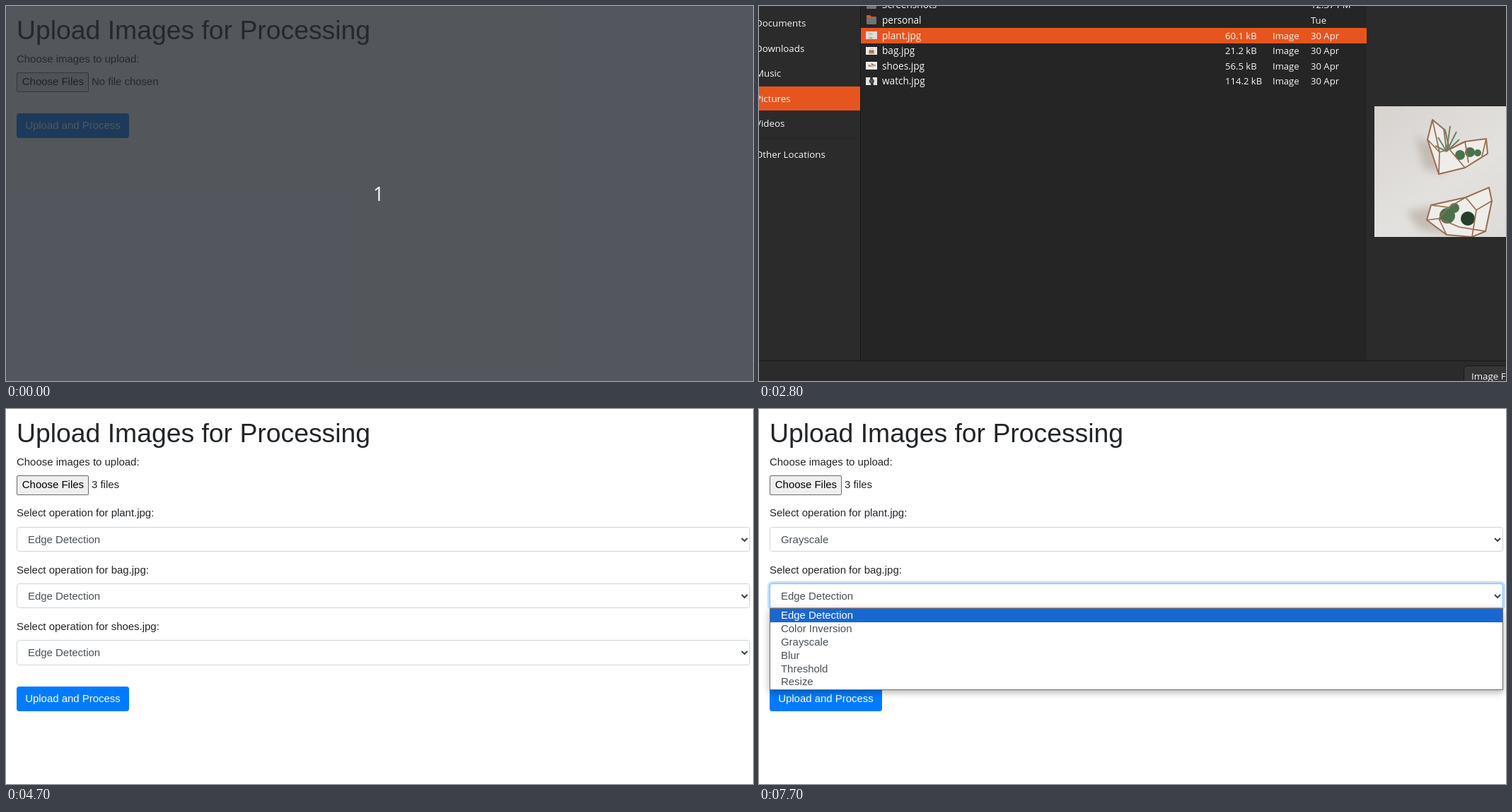
An HTML page for the animation above (8000 ms loop, 1056x531 px).

```html
<!DOCTYPE html>
<html lang="en">
<head>
<meta charset="utf-8">
<title>Upload Images for Processing</title>
<style>
html, body { margin: 0; width: 100%; height: 100%; overflow: hidden; background: #fff; }
#stage { position: absolute; left: 0; top: 0; width: 1056px; height: 531px; overflow: hidden;
  background: #fff; color: #212529; font: 14.94px "Liberation Sans", Arial, sans-serif; }
#stage div, #stage svg { position: absolute; box-sizing: border-box; }
.t { white-space: pre; line-height: 20px; }
.fill { left: 0; top: 0; width: 100%; height: 100%; }
#choose { left: 15px; top: 93.5px; width: 102px; height: 28px; border: 1px solid #6a6a6a; border-radius: 2px; }
#submit { left: 15px; width: 159px; height: 35.4px; border-radius: 3.7px; background: #007bff; color: #fff; }
.select { left: 15px; width: 1037px; height: 35.5px; border: 1px solid #ced4da; border-radius: 3.7px;
  background: #fff; color: #495057; }
#popup { left: 15px; width: 1037px; height: 116px; color: #495057; background: #fff;
  border: 1px solid #6d6d6d; box-shadow: 0 3px 10px rgba(0,0,0,.32); }
#popup.blank { background: #1e1e1e; border-color: #1e1e1e; }
#popup.blank div { visibility: hidden; }
.option { left: 0; width: 100%; height: 18.95px; }
.option.on { background: #1967d2; color: #fff; }
#dim { background: #000; }
#count { background: rgba(37,41,48,.79); }
#count .t { color: #fff; font: 27px/30px "Open Sans", sans-serif; }
#dialog { left: 0; top: -158px; width: 1138px; height: 721px; background: #2b2b2b; color: #f7f7f7;
  font: 13.3px "Open Sans", "Noto Sans", sans-serif; transform-origin: 0 360.6px; overflow: hidden; }
#inner { left: 0; top: 158px; width: 1138px; height: 563px; }
#list { left: 144px; top: -112px; height: 614px; background: #252525; }
.row { left: 144px; height: 21.6px; }
.row.on { background: #e6551e; }
.side { left: 0; width: 143px; height: 34px; }
.line { background: #191919; }
</style>
</head>
<body>
<svg width="0" height="0" style="position:absolute">
  <defs>
    <linearGradient id="wall" x1="0" y1="0" x2="1" y2="1">
      <stop offset="0" stop-color="#d6d3cf"/><stop offset=".5" stop-color="#e3e1de"/><stop offset="1" stop-color="#dcdad6"/>
    </linearGradient>
    <filter id="soft" x="-30%" y="-30%" width="160%" height="160%"><feGaussianBlur stdDeviation="6"/></filter>
  </defs>
  <symbol id="plant" viewBox="870 142 256 185" preserveAspectRatio="none">
    <path fill="url(#wall)" d="M870 142h256v185h-256z"/>
    <g fill="#a79a8c" opacity=".5" filter="url(#soft)">
      <path d="M928 186l30 10 12 42-30-8z"/><path d="M914 291l44-8 14 40-38-6z"/>
    </g>
    <g fill="#eeede9" stroke="#9a6b52" stroke-width="2" stroke-linejoin="round">
      <path d="M952 161L945 189L961 238L998 229L1030 209L1028 188L998 192L976 203L970 176Z"/>
      <path d="M950 282L944 303L972 324L1008 327L1027 319L1036 276L1032 257L999 271Z"/>
    </g>
    <g fill="#49724d">
      <circle cx="991" cy="211" r="7"/><circle cx="1005" cy="207" r="7"/><circle cx="1016" cy="208" r="5"/>
      <circle cx="973" cy="297" r="11"/><circle cx="983" cy="286" r="7"/><circle cx="1002" cy="301" r="10" fill="#263f2b"/>
    </g>
    <path fill="none" stroke="#6f8266" stroke-width="2" d="M972 206l-12-20m12 20l-4-33m4 33l5-36m-5 36l14-28m-14 28l18-17m-18 17l-16-8"/>
    <g fill="none" stroke="#9a6b52" stroke-width="1.7">
      <path d="M945 189L962 207L961 238M962 207L976 203L998 229M976 203L998 192L1003 222M952 161L962 207M1028 188L1022 213"/>
      <path d="M950 282L975 285L999 271L1014 289L1036 276M944 303L961 301L975 285M961 301L972 324M1014 289L1008 327M961 301L990 313L1027 319"/>
    </g>
  </symbol>
  <symbol id="bag" viewBox="0 0 256 185" preserveAspectRatio="none">
    <path fill="#ebe9e7" d="M0 0h256v185H0z"/>
    <path fill="none" stroke="#77503a" stroke-width="5" d="M94 82C94 18 164 18 164 82"/>
    <path fill="#b08361" d="M76 78h106l10 80H66z"/><path fill="#8d6347" d="M76 78h106l3 28H73z"/>
  </symbol>
  <symbol id="shoes" viewBox="0 0 256 185" preserveAspectRatio="none">
    <path fill="#efedeb" d="M0 0h256v185H0z"/>
    <path fill="#b39680" d="M58 62l34 4 30 26 52 12q14 6 12 20H52z"/><path fill="#faf8f5" d="M50 118h137v13H50z"/>
    <path fill="#8d7666" d="M120 38l28 6 30 22 46 10q8 8 4 16l-60 2-44-24z"/>
  </symbol>
  <symbol id="watch" viewBox="0 0 256 185" preserveAspectRatio="none">
    <path fill="#e4e4e4" d="M0 0h256v185H0z"/><path fill="#333" d="M96 0h58l20 185h-58z"/>
    <circle cx="132" cy="92" r="50" fill="#555" stroke="#222" stroke-width="14"/>
  </symbol>
  <symbol id="folder" viewBox="0 0 14 13">
    <path fill="#e6551e" d="M0 1q0-1 1-1h4l2 2h6q1 0 1 1v2H0z"/><path fill="#737373" d="M0 3h14v9q0 1-1 1H1q-1 0-1-1z"/>
  </symbol>
</svg>
<div id="stage"></div>
<script>
const SVG = 'http://www.w3.org/2000/svg';
const stage = document.getElementById('stage');

function box(parent, cls, css = {}, id) {
  const el = document.createElement('div');
  el.className = cls;
  if (id) el.id = id;
  Object.assign(el.style, css);
  parent.append(el);
  return el;
}
const rect = (x, y, w, h) => ({ left: x + 'px', top: y + 'px', width: w + 'px', height: h + 'px' });

// Text starting at x, centred vertically on y
function text(parent, str, x, y, size) {
  const el = box(parent, 't', { left: x + 'px', top: y - 10 + 'px' });
  if (size) el.style.fontSize = size + 'px';
  el.textContent = str;
  return el;
}
function art(parent, name, x, y, w, h) {
  const svg = document.createElementNS(SVG, 'svg');
  Object.assign(svg.style, rect(x, y, w, h));
  const use = document.createElementNS(SVG, 'use');
  use.setAttribute('href', '#' + name);
  use.setAttribute('width', w);
  use.setAttribute('height', h);
  svg.append(use);
  parent.append(svg);
  return use;
}
const show = (el, on) => { el.style.display = on ? '' : 'none'; };

// Upload page
const page = box(stage, 'fill');
text(page, 'Upload Images for Processing', 15, 33.7, 37.35);
text(page, 'Choose images to upload:', 15, 74.5);
const choose = box(page, '', {}, 'choose');
text(choose, 'Choose Files', 6.8, 12.8).style.color = '#000';
const chosen = text(page, '', 121, 107.3);

const form = box(page, 'fill');
const PITCH = 80.4;
const selects = ['plant', 'bag', 'shoes'].map((name, i) => {
  text(form, `Select operation for ${name}.jpg:`, 15, 147.3 + PITCH * i);
  const el = box(form, 'select', { top: 166.5 + PITCH * i + 'px' });
  const label = text(el, 'Edge Detection', 15, 17);
  const arrow = document.createElementNS(SVG, 'svg');
  Object.assign(arrow.style, rect(1022, 13, 12, 9));
  arrow.innerHTML = '<path d="M2 2l4 4 4-4" fill="none" stroke="#333b42" stroke-width="1.9"/>';
  el.append(arrow);
  return { el, label };
});
const submit = box(page, '', {}, 'submit');
text(submit, 'Upload and Process', 12.2, 17.3);

const popup = box(page, '', {}, 'popup');
const options = ['Edge Detection', 'Color Inversion', 'Grayscale', 'Blur', 'Threshold', 'Resize'].map((name, i) => {
  const el = box(popup, 'option', { top: 18.85 * i + 'px' });
  text(el, name, 15, 8.8);
  return el;
});

const dim = box(stage, 'fill', {}, 'dim');
const count = box(stage, 'fill', {}, 'count');
const digit = text(count, '1', 519, 266);
digit.style.top = '251px';

// File dialog
const dialog = box(stage, '', {}, 'dialog');
const inner = box(dialog, '', {}, 'inner');
box(inner, 'line', rect(0, -113, 1138, 1));
const list = box(inner, '', {}, 'list');

const places = {};
['Documents', 'Downloads', 'Music', 'Pictures', 'Videos', 'Other Locations'].forEach((name, i) => {
  const y = 24 + 35.5 * i + (i === 5 ? 8.5 : 0);
  places[name] = box(inner, 'side', { top: y - 17 + 'px' });
  text(inner, name, -5, y);
});
box(inner, '', { ...rect(0, 187, 143, 1), background: '#262626' });
box(inner, 'line', rect(143, -112, 1, 614));

const files = [
  ['Screenshots', '', '', '12:37 PM'],
  ['personal', '', '', 'Tue'],
  ['plant.jpg', '60.1 kB', 'Image', '30 Apr'],
  ['bag.jpg', '21.2 kB', 'Image', '30 Apr'],
  ['shoes.jpg', '56.5 kB', 'Image', '30 Apr'],
  ['watch.jpg', '114.2 kB', 'Image', '30 Apr']
];
const cells = [];
const rows = files.map(([name, ...cols], i) => {
  const top = -12.2 + 21.6 * i;
  const row = box(inner, 'row', { top: top + 'px' });
  if (i < 2) art(row, 'folder', 8, 3.5, 14, 13);
  else art(row, name.split('.')[0], 7, 5, 16, 11);
  text(row, name, 30, 10.6, 13.6);
  cols.forEach((str, c) => cells.push(text(row, str, [515, 582, 636][c], 10.6, 13.1)));
  return row;
});

const preview = box(inner, 'fill');
const photo = art(preview, 'plant', 870, 142, 256, 185);
const footer = box(inner, '', { ...rect(0, 502, 1138, 61), background: '#2b2b2b', borderTop: '1px solid #171717' });
const filter = box(footer, '', { ...rect(996, 6, 140, 34), background: '#363636', border: '1px solid #181818', borderRadius: '5px' });
text(filter, 'Image Files', 10, 14);

// Each step changes only the listed values
const start = { count: 0, button: '#efefef', dialog: 0, dim: 0, hover: 0, picked: 0, form: 0,
  rings: [0, 0], popup: -1, blank: 0, option: 0, first: 'Edge Detection' };
const steps = [
  [0, { count: 1 }],
  [100, { count: 0 }],
  [900, { button: '#e5e5e5' }],
  [1200, { button: '#f5f5f5' }],
  [1400, { button: '#e5e5e5' }],
  [1500, { dialog: .3, dim: .06 }],
  [1600, { dialog: .93, dim: .14 }],
  [1700, { dialog: 1, dim: .3 }],
  [2000, { hover: .5 }],
  [2100, { hover: 1 }],
  [2200, { hover: 0 }],
  [2800, { picked: 1 }],
  [3500, { picked: 2 }],
  [3800, { picked: 3 }],
  [4500, { dialog: .029, dim: .216, form: 1, button: '#efefef' }],
  [4600, { dialog: 0, dim: .06 }],
  [4700, { dim: 0 }],
  [5600, { popup: 0, blank: 1 }],
  [5700, { blank: 0, rings: [.7, 0] }],
  [5800, { rings: [1, 0] }],
  [6100, { option: 1 }],
  [6300, { option: 2 }],
  [6800, { popup: -1, first: 'Grayscale' }],
  [7500, { popup: 1, blank: 1, option: 0 }],
  [7600, { blank: 0, rings: [.3, .7] }],
  [7700, { rings: [0, 1] }]
];

function draw(s) {
  show(count, s.count);
  choose.style.background = s.button;
  chosen.textContent = s.form ? '3 files' : 'No file chosen';
  show(form, s.form);
  submit.style.top = (s.form ? 392.6 : 151.5) + 'px';
  s.rings.forEach((r, i) => {
    const mix = (a, b) => Math.round(a + (b - a) * r);
    selects[i].el.style.borderColor = `rgb(${mix(206, 128)},${mix(212, 189)},${mix(218, 255)})`;
    selects[i].el.style.boxShadow = r ? `0 0 0 ${3 * r}px rgba(0,123,255,${.25 * r})` : 'none';
  });
  selects[0].label.textContent = s.first;

  show(popup, s.popup >= 0);
  popup.style.top = 202 + PITCH * Math.max(0, s.popup) + 'px';
  popup.classList.toggle('blank', !!s.blank);
  options.forEach((el, i) => el.classList.toggle('on', i === s.option));

  dim.style.opacity = s.dim;
  show(dialog, s.dialog > 0);
  dialog.style.transform = s.dialog === 1 ? 'none' : `scaleY(${s.dialog})`;
  places.Music.style.background = `rgba(255,255,255,${.03 * s.hover})`;
  places.Pictures.style.background = s.hover ? `rgb(${230 + 4 * s.hover},${85 + 10 * s.hover},${30 + 12 * s.hover})` : '#e6551e';

  const width = s.picked ? 715 : 994;
  list.style.width = width + 'px';
  rows.forEach((el, i) => {
    el.style.width = width + 'px';
    el.classList.toggle('on', i > 1 && i < 2 + s.picked);
  });
  cells.forEach(el => { el.style.transform = s.picked ? 'none' : 'translateX(279px)'; });
  show(preview, s.picked);
  if (s.picked) photo.setAttribute('href', '#' + ['plant', 'bag', 'shoes'][s.picked - 1]);
}

let last = -1;
function tick() {
  const t = performance.now() % 8000;
  const n = steps.filter(([at]) => at <= t).length;
  if (n !== last) {
    draw(Object.assign({}, start, ...steps.slice(0, n).map(([, change]) => change)));
    last = n;
  }
  requestAnimationFrame(tick);
}
tick();
</script>
</body>
</html>
```
